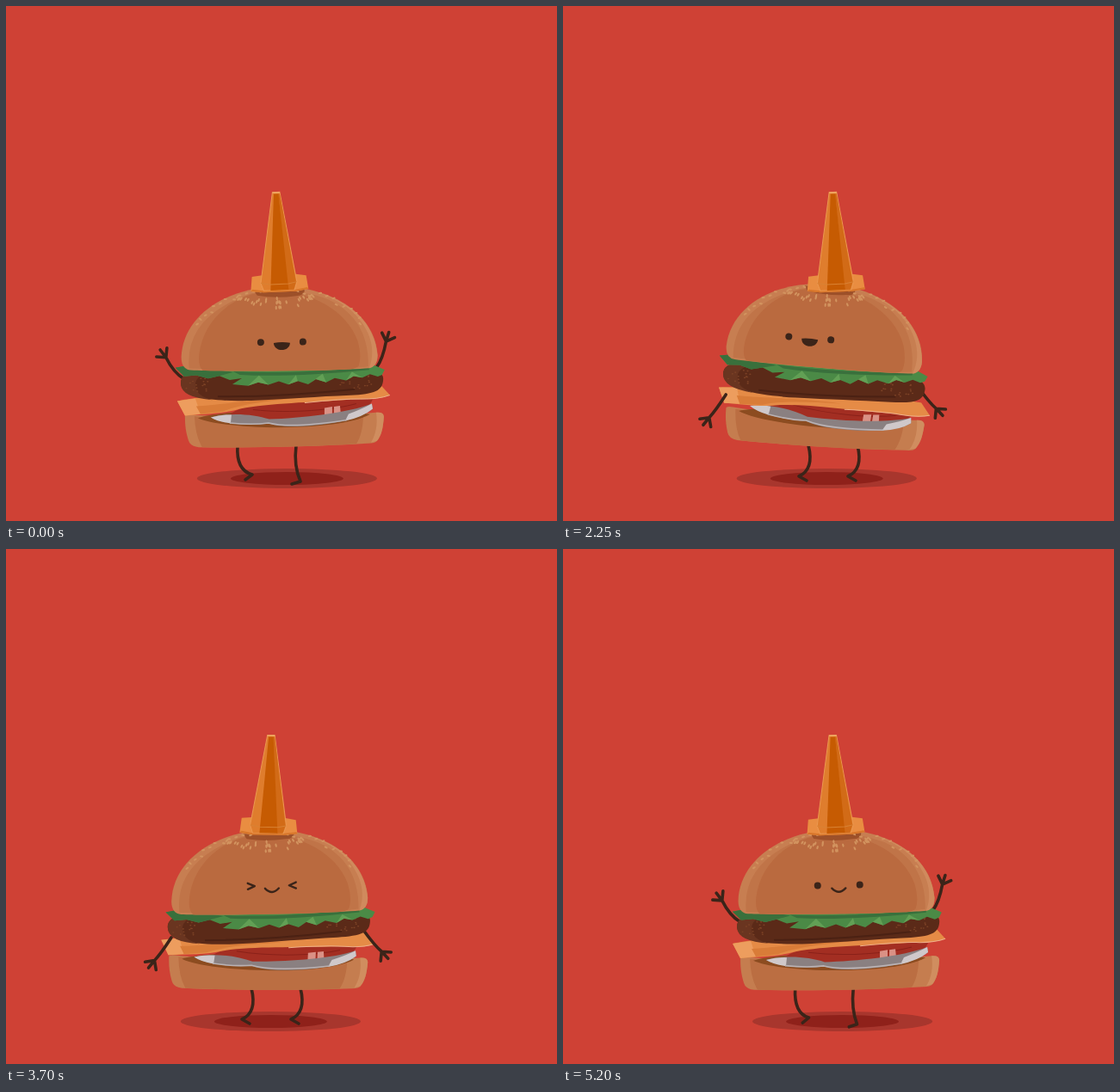
An HTML page for the animation above (5.25 s loop, 640 px wide and 599 px high).

```html
<!DOCTYPE html>
<html lang="en">
<head>
<meta charset="utf-8">
<title>Dancing burger</title>
<style>
  html, body { margin: 0; width: 100%; height: 100%; overflow: hidden; background: #cf4135; }
  svg { display: block; width: 100%; height: 100%; }
  .limb, .line { fill: none; stroke: #3b2419; stroke-linecap: round; stroke-linejoin: round; }
  .limb { stroke-width: 3.6; }
  .line { stroke-width: 2.4; }
  .ink { fill: #3b2419; }
</style>
</head>
<body>
<svg viewBox="0 0 640 599">
  <g id="shadow">
    <ellipse cy="549.5" rx="104.5" ry="11.5" fill="#a8362d"/>
    <ellipse cy="549.5" rx="65.5" ry="7.5" fill="#8f211a"/>
  </g>

  <path id="legL" class="limb"/>
  <path id="legR" class="limb"/>

  <g id="base">
    <path fill="#c57d4f" d="M206 478Q205 474 214 475C270 480 380 478 428 473Q437 472 437 478C436 492 434 500 429 506Q427 509 418 509C350 513 280 514 222 513Q212 512 210 505C207 495 206 488 206 478Z"/>
    <path fill="#bb6e42" d="M217 477C270 480 370 479 413 476C413 490 410 502 405 509.500C350 513 280 514 226 513Q218 500 217 477Z"/>
    <path fill="#d08d5f" d="M428 473Q437 472 437 478C436 492 434 500 429 506L422 508C428 498 430 486 428 473Z"/>
    <path fill="#8c4c20" d="M221 479C250 493 385 496 421 475C390 468 250 468 221 479Z"/>
  </g>

  <g id="fill">
    <path fill="#a32e22" d="M256 479C262 460 370 452 424 458C420 470 395 480 345 483C310 485 280 485 256 479Z"/>
    <path fill="none" stroke="#8a2119" d="M285 470C330 475 380 470 405 463"/>
    <path fill="#da9185" d="M368 468L377 466.500V476.500L368 477.500ZM379 466.500L386 465.500L387 475L379 476Z"/>
    <path fill="#8a8081" d="M236 479C258 473 285 475 304 481C340 480 395 474 423 463L424 469C410 482 365 490 325 489.500Q312 489 303 486C285 489 250 487 236 479Z"/>
    <path fill="#cfc8ca" d="M236 479Q248 475.500 260 476L259 486Q244 484 236 479ZM396 475Q412 469 423 463L424 469Q412 479 392 483Z"/>
    <path fill="none" stroke="#b9b1b3" stroke-width="1.6" d="M258 485.500Q284 488 303 485.500Q330 492 394 482"/>
    <g id="cheese">
      <path fill="#e58b46" d="M206 477L197 460C225 453 400 438 432 440L444 453C430 459 415 457 400 458C350 462 305 462 270 469C250 475 225 475 206 477Z"/>
      <path fill="#ed9d5e" d="M206 477L197 460L218 457L224 475Z"/>
      <path fill="#d97c38" d="M224 475L219 466C250 464 300 456 340 456C300 460 270 464 250 472Z"/>
      <path fill="none" stroke="#efb08a" d="M345 462Q390 457 410 457.500Q430 458 444 453"/>
    </g>
  </g>

  <path id="armL" class="limb"/>
  <path id="armR" class="limb"/>

  <g id="patty">
    <path fill="#5b2a18" d="M203 441C202 430 212 425 235 426L415 421Q437 421 438 432C438 447 428 450 400 452C360 454 330 457 290 459C255 461 205 460 203 441Z"/>
    <path fill="#6a3520" d="M203 441C202 430 212 425 235 426Q214 434 222 449Q226 456 240 459Q204 457 203 441Z"/>
    <path fill="none" stroke="#4b2113" stroke-width="2" d="M246 455Q320 455 405 445"/>
    <g id="crumbs" fill="#7c4226"></g>
  </g>

  <g id="bun">
    <path fill="#4b8a46" d="M187 419L205 416H412L430 424L427 430L422 432L413 429L404 433L394 431L385 436L372 433L362 438L350 434L341 440L329 436L318 440L307 436L295 440L283 437L271 441L253 439L264 432L250 434L238 429L225 432L211 428L197 429Z"/>
    <path fill="#39703c" d="M187 419L205 416L254 425L238 429L225 432L211 428L197 429ZM254 424Q320 428 412 421V424Q320 432 262 428Z"/>
    <path fill="#62a055" d="M271 441L284 429L295 440L283 437ZM318 440L327 429L329 436ZM341 440L358 428L362 438L350 434ZM385 436L392 426L404 433L394 431Z"/>
    <path fill="#c77e51" d="M205 422Q194 421 194 407C196 360 245 326 308 326C371 326 420 360 422 407Q422 420 412 422C380 424.500 240 424.500 205 422Z"/>
    <path fill="#c07448" d="M203 420Q198 360 275 334C300 328 345 330 372 345C402 362 412 390 411 420Q380 424 330 424Z"/>
    <path fill="#ba6a3f" d="M219 422.500Q213 418 215 402C220 368 248 338 290 332C335 327 385 350 399 390Q404 408 400 419Q398 422 390 423Q300 425 219 422.500Z"/>
    <path fill="#d08a5d" d="M352 333C392 344 419 370 422 407Q422 420 412 422Q420 402 411 381C400 356 380 343 352 333Z"/>
    <path fill="#9d5029" d="M279 330H338Q339 337 328 337Q305 340 283 336Z"/>
    <g id="seeds" fill="#d2935f"></g>
    <g id="face">
      <g id="eyesOpen" class="ink"><circle cx="-24.5" r="4"/><circle cx="24.5" r="4"/></g>
      <path id="eyesShut" class="line" d="M-28 -3L-20 .5L-28 4M28 -3L20 .5L28 4"/>
      <path id="grin" class="ink" d="M-9.500 1Q0 -.5 9.500 1C9 12 -9 12 -9.500 1Z"/>
      <path id="smile" class="line" d="M-8 3.500Q0 12 8 3.500"/>
    </g>
  </g>

  <g id="cone">
    <path fill="#e98d41" d="M277 314L289 313H328L340 315L342 331L327 333H290L275 331Z"/>
    <path fill="#d8762a" d="M277 329L290 331H327L341 329L342 331L327 333H290L275 331Z"/>
    <path fill="#df7d2d" stroke="#eb9850" d="M305 217H313.500L329 322L326 331H290L287 322Z"/>
    <path fill="#d26b17" d="M312 219L313.500 219L328 322L325 331H318Z"/>
    <path fill="#c65b02" d="M306.500 219H312L319 331H298Z"/>
    <path fill="none" stroke="#d98234" d="M287 322L298 324H319L329 322"/>
    <path stroke="#f0a864" stroke-width="1.6" d="M305 217.500H313.500"/>
  </g>
</svg>
<script>
const LOOP = 5250, BEATS = 8, TAU = Math.PI * 2;
const moods = ['grin', 'smile', 'squint', 'grin', 'squint', 'grin', 'smile'];
// Knee, ankle and toe relative to the hip.
const lift = [-2,27, 17,32, 9,38], stand = [-3,22, 5,40, -5,43], back = [7,26, -11,34, -2,39];

const $ = id => document.getElementById(id);
const wave = turns => Math.cos(TAU * turns);
const clamp = (v, lo, hi) => Math.min(hi, Math.max(lo, v));
const ease = v => { const u = clamp(v, 0, 1); return u * u * (3 - 2 * u); };
// 1 near a point of the cycle, easing to 0 at distance w.
const bump = (turns, w) => ease(2 - 2 * Math.abs(turns - Math.round(turns)) / w);

function scatter() {
  let seed = 11;
  const rnd = () => (seed = seed * 16807 % 2147483647) / 2147483647;
  const dot = (x, y, rx, ry, a) => `<ellipse rx="${rx}" ry="${ry}" transform="translate(${x} ${y}) rotate(${a})"/>`;
  let seeds = '', crumbs = '';
  for (let i = 0; i < 34; i++) {
    const u = rnd() * 2 - 1;
    seeds += dot(304 + u * 44, 336 + (1 - u * u) * 15 * rnd() + rnd() * 4, 1.1, 2.2, -u * 45);
  }
  for (let i = 0; i < 28; i++) {
    const a = TAU * (.08 + i / 28 * .35), r = .93 + rnd() * .075;
    seeds += dot(308 + 114 * r * Math.cos(a), 407 - 81 * r * Math.sin(a), 2.1, 1.1, rnd() * 90 - 45);
  }
  for (let i = 0; i < 36; i++) {
    const left = i < 16;
    crumbs += dot(left ? 209 + rnd() * 28 : 384 + rnd() * 44, (left ? 434 : 429) + rnd() * 15, 1.1, .8, 0);
  }
  $('seeds').innerHTML = seeds;
  $('crumbs').innerHTML = crumbs;
}

function place(id, x, y, angle = 0, px = 0, py = 0) {
  $(id).setAttribute('transform', `translate(${x} ${y}) rotate(${angle}) translate(${-px} ${-py})`);
}

function drawArm(id, side, x, y, degrees, len) {
  const a = degrees * TAU / 360;
  const at = (px, py, t, r) => [px + side * r * Math.cos(t), py - r * Math.sin(t)];
  const [wx, wy] = at(x, y, a, len), [mx, my] = at(x, y, a, len / 2);
  let d = `M${x} ${y}Q${mx + side * 2} ${my + 5} ${wx} ${wy}`;
  for (const turn of [-.8, .05, .8]) d += `M${wx} ${wy}L${at(wx, wy, a + turn, 11)}`;
  $(id).setAttribute('d', d);
}

function drawLeg(id, x, lifted, straight) {
  const p = back.map((v, i) => v + (lift[i] - v) * lifted + (stand[i] - v) * straight + (i % 2 ? 513 : x));
  $(id).setAttribute('d', `M${x} 511Q${p[0]} ${p[1]} ${p[2]} ${p[3]}L${p[4]} ${p[5]}`);
}

function draw(t) {
  const beat = t / LOOP * BEATS;

  // Hips swing once a beat, the head leads them, the cone sways twice as fast.
  const hip = 311.5 + 11 * wave(beat - .02);
  const head = 310 + 8 * wave(beat + .04);
  const top = 309.5 + 9 * wave(2 * beat + .06);
  const middle = (hip + head) / 2;
  const lean = .35 * (top - head) - .7;
  const tilt = .24 * (top - hip) + 1;

  place('shadow', hip + 4, 0);
  place('base', hip, 493, tilt, 320.5, 493);
  place('fill', hip - .5, 467.5, 2 * Math.max(0, tilt), 320, 468);
  place('cheese', 0, Math.abs(tilt) * .8);
  place('patty', middle, 442, 1.1 * lean + 1.3, 320, 442);
  place('bun', head, 422 - .6 * lean, lean, 308, 422);
  place('cone', top, 331.5, .28 * (309 - top), 308.5, 332);

  // Two kicks a beat; the kicking foot changes every beat.
  const kick = bump(beat + .02, .1) + bump(beat - .34, .08);
  const side = clamp(4 * wave(beat / 2), -1, 1);
  const kickL = kick * Math.max(0, side), kickR = kick * Math.max(0, -side);
  drawLeg('legL', 285 - 16 * kickL - 4 * kickR, kickL, kickR);
  drawLeg('legR', 342 - 5 * kickL - 18 * kickR, kickR, kickL);

  const raise = Math.tanh(4 * (wave(beat) - .15));
  const reach = 33 + 5 * (1 - raise * raise);
  drawArm('armL', -1, middle - 113, 443 - 9 * raise, 52 * raise - 2, reach);
  drawArm('armR', 1, middle + 110, 432 - 11 * raise, 60 * raise + 10, reach);

  const turned = ease((t - 400) / 200) - ease((t - 2700) / 200);
  place('face', 311 - 21 * turned, 390.5);
  const mood = moods[Math.floor(t / LOOP * moods.length)];
  const show = (id, on) => $(id).style.display = on ? '' : 'none';
  show('eyesOpen', mood !== 'squint');
  show('eyesShut', mood === 'squint');
  show('grin', mood === 'grin');
  show('smile', mood !== 'grin');
}

scatter();
const start = performance.now();
function tick() {
  const t = (performance.now() - start) % LOOP;
  draw(Math.floor(t / 50) * 50);
  requestAnimationFrame(tick);
}
tick();
</script>
</body>
</html>
```
